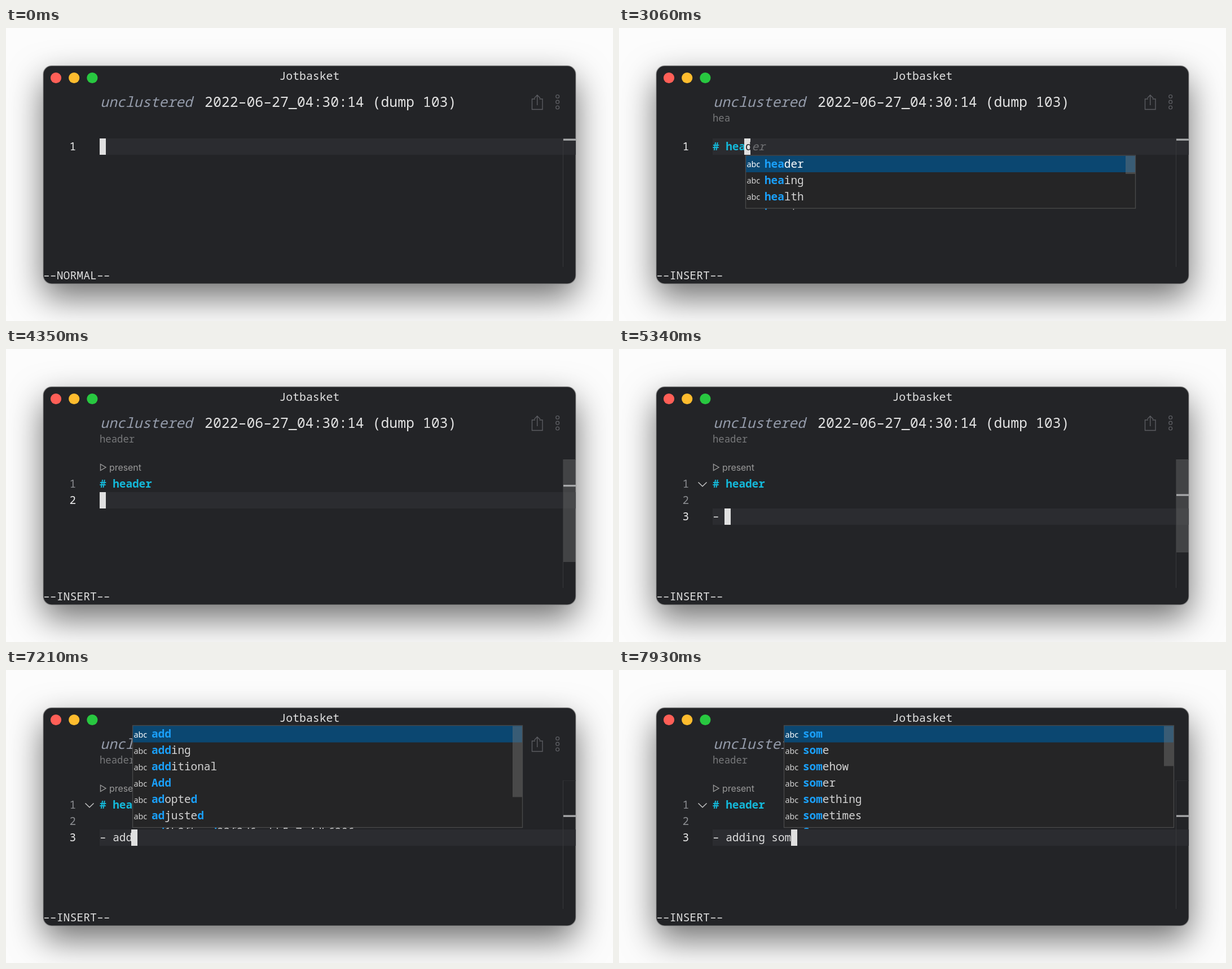
An HTML page with a canvas that plays this animation: 1076 px wide and 520 px high, repeating every 8000 ms.

```html
<!DOCTYPE html>
<html lang="en">
<head>
<meta charset="utf-8">
<title>Note editor</title>
<style>
html, body { margin: 0; height: 100%; overflow: hidden; background: #fcfcfc; }
canvas { display: block; }
</style>
</head>
<body>
<canvas id="stage" width="1076" height="520"></canvas>
<script>
const ctx = document.getElementById('stage').getContext('2d');
const LOOP = 8000, CELL = 11.6, LEFT = 166, ROW = 29, TOP = 196;
const MONO = '"Noto Sans Mono", monospace';
const CODE = '19.33px ' + MONO, BOLD = 'bold ' + CODE;
const BG = '#232427', TEXT = '#dfdfdf', CYAN = '#14b9da', BLUE = '#1aa0fb';

// Suggestion list; a scroll thumb height marks a list longer than its box.
const popup = (x, words, thumb = 0, above = false) =>
  ({ popup: { x, words: words.split(' '), thumb, above } });
const type = (...lines) => ({ lines, cursor: true });

const HEA = 'header heaing health heart';
const HEAD = 'header Header Herausforderung';
const ADD = 'add adding additional Add adopted adjusted ad1b2fbcad23f2d6eabb5c7c4db6206ac';
const SOM = 'som some somehow somer something sometimes Sommer';

const initial = {
  mode: 'NORMAL', lines: [''], cursor: true, note: '', ghost: '',
  lens: false, fold: false, slider: 0, popup: null
};
const steps = [
  [500, { mode: 'INSERT' }],
  [1000, { cursor: false }],
  [1500, { cursor: true }],
  [2000, { cursor: false }],
  [2410, type('#')],
  [2660, type('# ')],
  [2820, { ...type('# h'), note: 'h' }],
  [2900, { ...type('# he'), note: 'he' }],
  [2980, { ...popup(213, HEA, 24), ghost: 'ader' }],
  [3060, { ...type('# hea'), note: 'hea', ...popup(224, HEA, 32), ghost: 'der' }],
  [3140, { ...type('# head'), note: 'head', ...popup(236, HEAD + ' headline', 70), ghost: 'er' }],
  [3300, { ...type('# heade'), note: 'heade', ...popup(248, HEAD), ghost: 'r' }],
  [3380, { ...type('# header'), note: 'header', ...popup(260, HEAD), ghost: '' }],
  [3630, { lens: true, slider: 0.75 }],
  [3710, { slider: 1 }],
  [3870, { cursor: false }],
  [4030, { popup: null }],
  [4350, type('# header', '')],
  [4510, { fold: true }],
  [4760, type('# header', '', '')],
  [5260, type('# header', '', '–')],
  [5340, type('# header', '', '– ')],
  [5740, { slider: 0.4 }],
  [5820, { slider: 0, cursor: false }],
  [6310, { cursor: true }],
  [6810, { cursor: false }],
  [6890, type('# header', '', '– a')],
  [6970, popup(202, 'a all also and as at are', 40, true)],
  [7130, { ...type('# header', '', '– ad'), ...popup(213, ADD, 100, true) }],
  [7210, { ...type('# header', '', '– add'), ...popup(224, ADD, 126, true) }],
  [7370, { ...type('# header', '', '– addi'), ...popup(236, 'adding additional') }],
  [7450, { ...type('# header', '', '– addin'), ...popup(248, 'adding additional') }],
  [7530, { ...type('# header', '', '– adding'), ...popup(260, 'adding') }],
  [7690, { ...type('# header', '', '– adding '), popup: null }],
  [7770, type('# header', '', '– adding s')],
  [7850, { ...type('# header', '', '– adding so'), ...popup(292, SOM, 60, true) }],
  [7930, { ...type('# header', '', '– adding som'), ...popup(292, SOM, 71, true) }]
];

function rect(x, y, w, h, color) {
  ctx.fillStyle = color;
  ctx.fillRect(x, y, w, h);
}

function write(text, x, y, font, color) {
  ctx.font = font;
  ctx.fillStyle = color;
  ctx.fillText(text, x, y);
}

function stroke(d, color, width) {
  ctx.strokeStyle = color;
  ctx.lineWidth = width;
  ctx.stroke(new Path2D(d));
}

function circle(x, y, r) {
  ctx.beginPath();
  ctx.arc(x, y, r, 0, Math.PI * 2);
}

function drawWindow() {
  rect(0, 0, 1076, 520, '#fcfcfc');
  ctx.beginPath();
  ctx.roundRect(66, 67, 944, 387, 15);
  ctx.save();
  ctx.shadowColor = 'rgba(0,0,0,.56)';
  ctx.shadowBlur = 60;
  ctx.shadowOffsetY = 24;
  ctx.fillStyle = BG;
  ctx.fill();
  ctx.restore();
  ctx.lineWidth = 1.5;
  ctx.strokeStyle = 'rgba(140,140,140,.6)';
  ctx.stroke();

  ['#ff5f57', '#febc2e', '#28c840'].forEach((color, i) => {
    circle(88.5 + 32.2 * i, 88.5, 9.6);
    ctx.fillStyle = color;
    ctx.fill();
  });
  write('Jotbasket', 484.5, 92, '19.8px ' + MONO, '#e2e2e2');
  write('unclustered', 167, 140, 'italic 24.8px ' + MONO, '#959cab');
  write('2022–06–27_04:30:14 (dump 103)', 352, 140, '24.8px ' + MONO, '#e2e2e2');

  const icon = '#5b5c61';
  stroke('M938 126H932.5V144.5H951V126H945.5M941.7 137V119.5M936.5 124.5L941.7 119L947 124.5', icon, 1.4);
  for (const y of [121.5, 131.2, 141]) {
    circle(977.7, y, 2.9);
    ctx.stroke();
  }
}

function drawScrollbar(state, line) {
  const marker = state.lens ? [219.5, 241, 257.5][line] : 196.5;
  rect(987, TOP, 1, 228, '#37383b');
  rect(988, TOP, 22, 1, '#2d2e31');
  const height = [203, 182, 165][line];
  rect(988, TOP, 22, height, `rgba(121,121,121,${0.37 * state.slider})`);
  rect(988, marker, 22, 3.3, '#a7a8aa');
}

function drawEditor(state) {
  const { lines, ghost } = state;
  const last = lines.length - 1;
  const top = TOP + (state.lens ? ROW : 0);
  const lineTop = top + last * ROW;

  rect(LEFT, lineTop, 844, ROW, '#2b2c30');
  drawScrollbar(state, last);
  write(state.note, LEFT, 166, '17.3px ' + MONO, '#77787a');
  if (state.lens) {
    stroke('M167.5 204.5V215.5L177 210Z', '#999', 1.4);
    write('present', 183, 215.8, '15.9px Inter, sans-serif', '#999');
  }
  if (state.fold) stroke('M140.5 236.5L148 243.7L155.5 236.5', '#c5c5c5', 1.5);

  lines.forEach((text, i) => {
    const y = top + i * ROW + 21;
    const heading = text.startsWith('#');
    write(i + 1, 112.4, y, CODE, i === last ? '#ececec' : '#8b8d91');
    write(text, LEFT, y, heading ? BOLD : CODE, heading ? CYAN : TEXT);
  });

  const col = lines[last].length;
  const x = LEFT + col * CELL;
  write(ghost.slice(1), x + CELL, lineTop + 21, 'italic ' + CODE, '#717275');
  if (state.cursor) {
    rect(Math.floor(x - (col && col < 8 ? 1.5 : 0)), lineTop, 11, ROW, '#e0e0e0');
  }
  write(ghost.slice(0, 1), x, lineTop + 21, CODE, state.cursor ? BG : '#717275');
  if (state.popup) drawPopup(state.popup, lines[last].split(' ').pop(), lineTop);
  write(`––${state.mode}––`, 66, 446, '19.8px ' + MONO, '#dcdcdc');
}

// Letters that match the typed word in order are bold blue.
function drawWord(word, typed, x, y, color) {
  let found = 0;
  [...word].forEach((letter, i) => {
    const hit = found < typed.length && letter.toLowerCase() === typed[found];
    if (hit) found++;
    write(letter, x + i * CELL, y, hit ? BOLD : CODE, hit ? BLUE : color);
  });
}

function drawPopup({ x, words, thumb, above }, typed, lineTop) {
  const width = 692;
  const y = above ? 98 : lineTop + ROW + 0.5;
  const height = above ? 182 : thumb ? 95 : words.length * ROW + 2.5;
  rect(x, y, width, height, '#252526');
  rect(x + 1, y + 1, width - 2, ROW + 0.5, '#0b4771');
  ctx.save();
  ctx.beginPath();
  // The next row peeks out just below the box.
  ctx.rect(x, y, width, height + 2);
  ctx.clip();
  words.forEach((word, i) => {
    const base = y + 22.3 + i * ROW;
    const color = i ? '#d4d4d4' : '#fff';
    write('abc', x + 2.5, base - 0.8, '14.3px "Noto Sans", sans-serif', color);
    drawWord(word, typed, x + 34, base, color);
  });
  ctx.restore();
  if (thumb) rect(x + width - 18, y + 1.5, 17, thumb, 'rgba(121,121,121,.42)');
  ctx.strokeStyle = '#4a4a4b';
  ctx.lineWidth = 1.3;
  ctx.strokeRect(x + 0.5, y + 0.5, width - 1, height - 1);
}

let shown = -1;
function frame() {
  const time = performance.now() % LOOP;
  const past = steps.filter(([at]) => at <= time);
  if (past.length !== shown) {
    shown = past.length;
    drawWindow();
    drawEditor(Object.assign({}, initial, ...past.map(([, change]) => change)));
  }
  requestAnimationFrame(frame);
}
frame();
</script>
</body>
</html>
```
